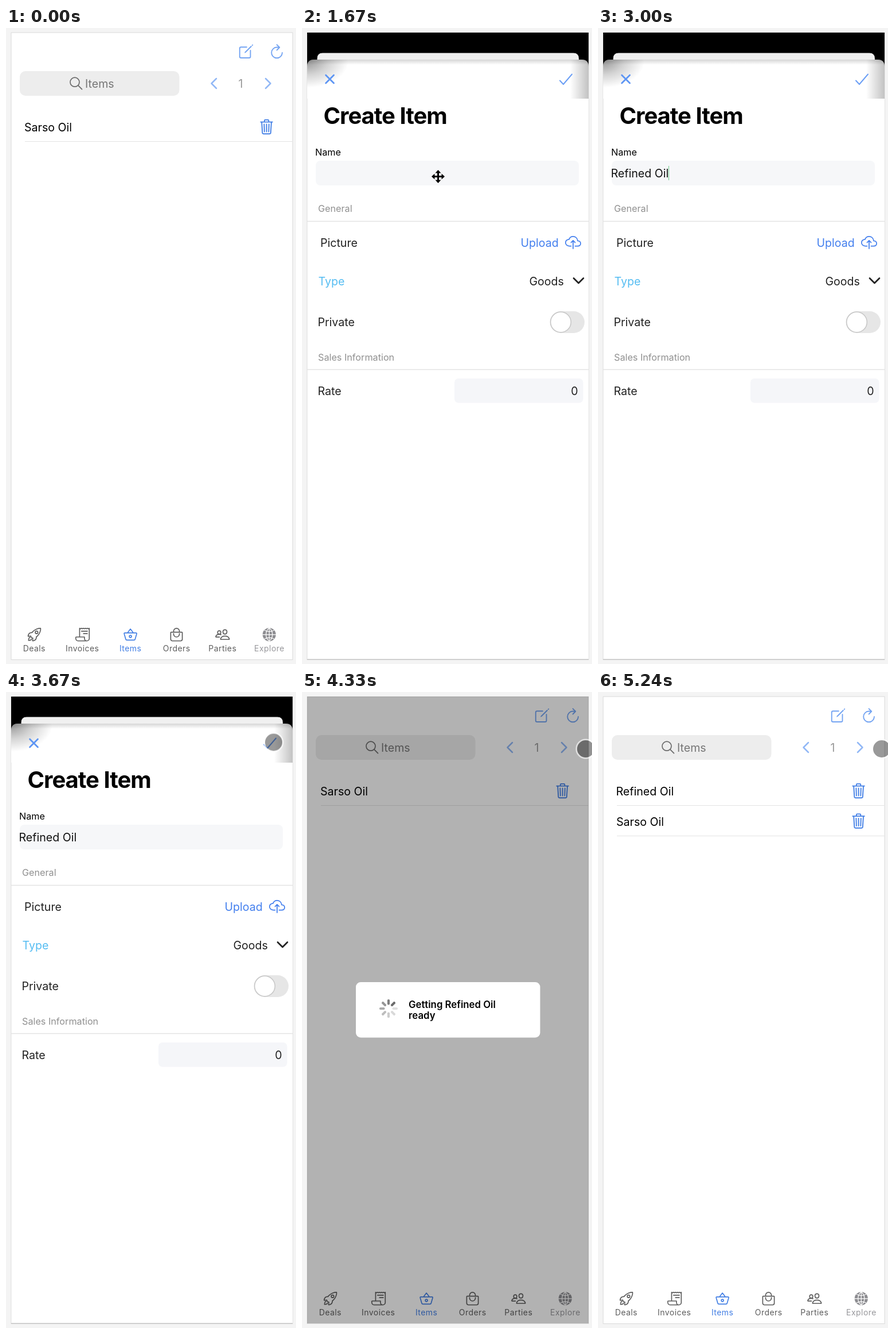
Recreate the animation shown at these times as an HTML page. Size 506x1107 px, loop 5820 ms.

```html
<!DOCTYPE html>
<html lang="en">
<head>
<meta charset="utf-8">
<title>Create Item</title>
<style>
html, body { margin: 0; width: 100%; height: 100%; overflow: hidden; background: #f4f4f4; }
svg { display: block; width: 100vw; height: 100vh; }
text, .name { font: 19.6px Inter, Roboto, sans-serif; }
.icon { fill: none; stroke: currentColor; stroke-width: 32; stroke-linecap: round; stroke-linejoin: round; }
.line { fill: none; stroke: currentColor; stroke-linecap: round; stroke-linejoin: round; }
.tabs text { font-size: 14px; letter-spacing: .45px; text-anchor: middle; fill: currentColor; }
.small { font-size: 16.2px; fill: #909090; }
.rule { stroke: #e4e4e4; fill: none; }
.form { fill: #222; }

/* every change is a hard cut on one 5820 ms clock */
.list, .sheet, .first, .rows, .busy, .edges, .dot, .move, .caret, .name b {
  animation: 5820ms step-end infinite;
}
.sheet { animation-name: sheet; }
.first { animation-name: first; }
.rows { animation-name: rows; }
.busy { animation-name: busy; }
.edges { animation-name: edges; }
.dot { animation-name: dot; }
.move { animation-name: move; }
.caret { animation-name: caret; }
@keyframes sheet { 0% { visibility: hidden } 17.18% { visibility: visible } 68.72%, 100% { visibility: hidden } }
@keyframes first { 0% { visibility: visible } 80.24%, 100% { visibility: hidden } }
@keyframes rows { 0% { visibility: hidden } 80.24%, 100% { visibility: visible } }
@keyframes busy { 0% { visibility: hidden } 74.39% { visibility: visible } 80.24%, 100% { visibility: hidden } }
@keyframes edges { 0% { visibility: hidden } 68.72% { visibility: visible } 74.39%, 100% { visibility: hidden } }
@keyframes move { 0% { visibility: hidden } 28.69% { visibility: visible } 34.36%, 100% { visibility: hidden } }
@keyframes dot {
  0% { visibility: hidden; transform: translate(443px, 29px) }
  5.67% { visibility: visible; transform: translate(443px, 29px) }
  11.51% { visibility: visible; transform: translate(420px, 38px) }
  17.18% { visibility: visible; transform: translate(371px, 203px) }
  22.85% { visibility: visible; transform: translate(238px, 258px) }
  28.69% { visibility: hidden; transform: translate(238px, 258px) }
  57.21% { visibility: visible; transform: translate(495px, 107px) }
  63.05% { visibility: visible; transform: translate(467px, 87.5px) }
  74.39%, 100% { visibility: visible; transform: translate(495px, 99px) }
}
@keyframes caret {
  0% { opacity: 0 } 22.85% { opacity: 1 } 28.69% { opacity: 0 }
  34.36% { opacity: 1 } 57.21%, 100% { opacity: 0 }
}

/* the name is typed in four bursts */
.name { height: 26px; line-height: 26px; white-space: pre; color: #111; }
.name b { font-weight: 400; font-size: 0; }
.name b:nth-child(1) { animation-name: type1; }
.name b:nth-child(2) { animation-name: type2; }
.name b:nth-child(3) { animation-name: type3; }
.name b:nth-child(4) { animation-name: type4; }
@keyframes type1 { 0% { font-size: 0 } 34.36%, 100% { font-size: 19.6px } }
@keyframes type2 { 0% { font-size: 0 } 40.03%, 100% { font-size: 19.6px } }
@keyframes type3 { 0% { font-size: 0 } 45.87%, 100% { font-size: 19.6px } }
@keyframes type4 { 0% { font-size: 0 } 51.54%, 100% { font-size: 19.6px } }
.caret { display: inline-block; width: 1.5px; height: 25px; margin-right: -1.5px; background: #6cc98a; vertical-align: top; }
</style>
</head>
<body>
<svg viewBox="0 0 506 1107">
<defs>
  <g id="trash" class="icon" color="#4480e6" transform="translate(439.6 157) scale(.0586)">
    <path d="M112 112l20 320c.95 18.49 14.4 32 32 32h184c17.67 0 30.87-13.51 32-32l20-320M80 112h352M192 112V72a24 24 0 0124-24h80a24 24 0 0124 24v40M256 176v224M184 176l8 224M328 176l-8 224"/>
  </g>
  <rect id="spoke" x="-2.1" y="-16" width="4.2" height="9.5" rx="1.8"/>
  <radialGradient id="corner" gradientUnits="userSpaceOnUse" cx="0" cy="0" r="1" gradientTransform="translate(9 58) scale(72 46)">
    <stop offset="0" stop-opacity=".4"/><stop offset=".5" stop-opacity=".17"/><stop offset="1" stop-opacity="0"/>
  </radialGradient>
  <linearGradient id="side" x1="1" x2="0">
    <stop offset="0" stop-opacity=".24"/><stop offset=".5" stop-opacity=".12"/><stop offset="1" stop-opacity="0"/>
  </linearGradient>
  <linearGradient id="strip" x2="0" y2="1">
    <stop offset="0" stop-opacity=".16"/><stop offset="1" stop-opacity="0"/>
  </linearGradient>
  <clipPath id="card"><path d="M9 123V67q0-12 12-12H488q12 0 12 12v56z"/></clipPath>
</defs>

<rect width="506" height="1107" fill="#f4f4f4"/>
<rect x="9" y="8" width="491" height="1091.5" fill="#fff" stroke="#dadada"/>

<g class="list">
  <g class="icon" color="#74a4f2">
    <g transform="translate(404 25.8) scale(.0586)">
      <path d="M384 224v184a40 40 0 01-40 40H104a40 40 0 01-40-40V168a40 40 0 0140-40h167"/>
      <path fill="currentColor" stroke="none" d="M460 53a16 16 0 00-23 0L424 65a8 8 0 000 11l12 12a8 8 0 0011 0l12-12a16 16 0 001-23zM399 90L219 270a9 9 0 00-3 4l-8 25a4 4 0 005 5l25-9a9 9 0 004-2l180-180a9 9 0 000-13l-10-10a9 9 0 00-13 0z"/>
    </g>
    <path transform="translate(457.6 25.7) scale(.0586)" d="M320 146s24.36-12-64-12a160 160 0 10160 160M256 58l80 80-80 80"/>
  </g>
  <rect x="24" y="75" width="278.5" height="43" rx="10" fill="#ededed"/>
  <g class="line" color="#6c6c6c" stroke-width="1.7"><circle cx="120" cy="94.2" r="8"/><path d="M126 100.2l6.5 6.5"/></g>
  <text x="138" y="104" fill="#777">Items</text>
  <path class="line" color="#92b8f6" stroke-width="2.5" d="M367 88l-8.5 8.5 8.5 8.5M453 88l8.5 8.5-8.5 8.5"/>
  <text x="409.5" y="104" text-anchor="middle" fill="#979797">1</text>

  <use href="#trash"/>
  <path class="rule" d="M33 197.5H500"/>
  <text class="first" x="32" y="180">Sarso Oil</text>
  <g class="rows">
    <text x="31.5" y="180">Refined Oil</text>
    <text x="32" y="232.5">Sarso Oil</text>
    <use href="#trash" y="52.5"/>
    <path class="rule" d="M33 250.5H500"/>
  </g>

  <g class="tabs" color="#5e5e5e">
    <g class="icon">
      <g transform="translate(36 1042.3) scale(.0527)">
        <path d="M462 54a4 4 0 00-3-4c-55-13-180 34-249 103a295 295 0 00-33 39c-21-2-42 0-60 7-50 22-65 80-69 105a9 9 0 0010 11l81-9a180 180 0 001 18 18 18 0 005 11l32 32a18 18 0 0011 5 180 180 0 0018 1l-9 81a9 9 0 0010 10c25-4 83-19 105-69 8-18 10-39 8-60a294 294 0 0039-33c68-68 115-191 103-248z"/>
        <circle cx="329" cy="183" r="43"/>
        <path d="M110 352a45 45 0 00-27 13C66 383 64 448 64 448s66-2 83-19a45 45 0 0013-27"/>
      </g>
      <path transform="translate(120 1042.3) scale(.0527)" d="M160 336V48l32 16 32-16 32 16 32-16 32 16 32-16 32 16 32-16 32 16 32-16v336a80 80 0 01-160 0v-48H48a16 16 0 00-16 16c0 64 7 112 80 112h288M224 144h192M288 224h128"/>
      <g color="#437fe4" transform="translate(203.6 1042.7) scale(.0527)">
        <path d="M68 192A20 20 0 0048 212l1 6 52 182a40 40 0 0039 30h232a41 41 0 0040-30l52-182v-6a20 20 0 00-20-20zM160 192l96-128 96 128"/>
        <circle cx="256" cy="311" r="37"/>
      </g>
      <path transform="translate(284 1042.3) scale(.0527)" d="M80 176a16 16 0 00-16 16v216c0 30 26 56 56 56h272c30 0 56-25 56-55V192a16 16 0 00-16-16zM160 176v-32a96 96 0 01192 0v32M160 224v16a96 96 0 00192 0v-16"/>
      <path transform="translate(364.3 1042.3) scale(.0527)" d="M402 168c-3 41-33 72-66 72s-63-31-66-72c-3-42 26-72 66-72s69 30 66 72zM336 304c-65 0-128 32-144 95-2 9 4 17 12 17h264c8 0 14-8 12-17-16-64-79-95-144-95zM200 186c-2 32-27 58-53 58s-51-26-53-58c-2-34 21-58 53-58s55 25 53 58zM206 260c-18-8-38-11-59-11-52 0-102 25-115 76-1 6 3 13 10 13h112"/>
    </g>
    <g transform="translate(459.3 1055.8)">
      <circle r="11.6" fill="#8c8c90"/>
      <path fill="none" stroke="#fff" stroke-width="1.2" d="M0-12V12M-12 0H12M0-11.5C-7.5-6-7.5 6 0 11.5 7.5 6 7.5-6 0-11.5M-8.5-7.5Q0-3 8.5-7.5M-8.5 7.5Q0 3 8.5 7.5"/>
    </g>
    <text x="49.3" y="1085">Deals</text>
    <text x="133.2" y="1085">Invoices</text>
    <text x="217.2" y="1085" color="#437fe4">Items</text>
    <text x="297.7" y="1085">Orders</text>
    <text x="377.8" y="1085">Parties</text>
    <text x="459.5" y="1085" color="#98989c">Explore</text>
  </g>
</g>

<g class="edges" fill="none" stroke="#555">
  <path d="M9.5 1099V8.5H500M9 1031.5H500M9 1098.5H500"/>
  <path stroke="#aaa" d="M500 8V1099"/>
</g>

<g class="busy">
  <rect x="9" y="8" width="491" height="1091" fill-opacity=".3"/>
  <rect x="94" y="505" width="321.5" height="96.5" rx="8.5" fill="#fff"/>
  <g transform="translate(151 551)">
    <use href="#spoke" transform="rotate(45)" opacity=".58"/>
    <use href="#spoke" opacity=".5"/>
    <use href="#spoke" transform="rotate(-45)" opacity=".41"/>
    <use href="#spoke" transform="rotate(-90)" opacity=".33"/>
    <use href="#spoke" transform="rotate(-135)" opacity=".26"/>
    <use href="#spoke" transform="rotate(180)" opacity=".2"/>
    <use href="#spoke" transform="rotate(135)" opacity=".15"/>
    <use href="#spoke" transform="rotate(90)" opacity=".12"/>
  </g>
  <g style="font-weight:600">
    <text x="186" y="550" style="font-size:16.8px;font-weight:600">Getting Refined Oil</text>
    <text x="186" y="569" style="font-size:16.8px;font-weight:600">ready</text>
  </g>
</g>

<g class="sheet">
  <rect x="9" y="8" width="491" height="1091" fill="#fff"/>
  <path class="rule" d="M9 60V1099M500.5 60V1099"/>
  <path stroke="#b4b4b4" d="M9 1099H500"/>
  <rect x="9" y="8" width="491" height="62"/>
  <path fill="#f0f0f0" d="M26.500 70V53q0-9.500 9.500-9.500H473.500q9.500 0 9.500 9.500V70z"/>
  <path fill="#fff" d="M9 123V67q0-12 12-12H488q12 0 12 12v56z"/>
  <g clip-path="url(#card)">
    <rect x="9" y="55" width="72" height="49" fill="url(#corner)"/>
    <rect x="9" y="55" width="491" height="9" fill="url(#strip)"/>
    <rect x="468" y="55" width="32" height="68" fill="url(#side)"/>
  </g>
  <path class="line" color="#5d95f4" stroke-width="2.7" d="M41.500 82l14 14M55.500 82l-14 14"/>
  <path class="line" color="#6c9ff5" stroke-width="2" d="M450 91.500l6 6.500 15-17.500"/>
  <text x="37.500" y="167" style="font-size:40px;font-weight:700;letter-spacing:-1px">Create Item</text>
  <text x="23" y="222" style="font-size:16.2px">Name</text>
  <rect x="24" y="231" width="459" height="43" rx="8" fill="#f6f7f9"/>
  <text class="small" x="28" y="320">General</text>
  <path class="rule" stroke-width="1.3" d="M9 336.500H500M9 594.500H500"/>
  <g class="form">
    <text x="32" y="381">Picture</text>
    <text x="381.500" y="381" fill="#437fee">Upload</text>
    <text x="28.500" y="448" fill="#56bdf2">Type</text>
    <text x="396.500" y="448">Goods</text>
    <text x="27.500" y="519">Private</text>
    <text x="27.500" y="639">Rate</text>
  </g>
  <path class="icon" color="#437fee" transform="translate(459 359.400) scale(.0547)" d="M320 368h76c55 0 100-29 100-84s-53-81-96-83c-9-85-71-137-144-137-69 0-113 46-128 91-60 6-112 44-112 107s54 106 120 106h56M320 256l-64-64-64 64M256 448V208"/>
  <path class="line" color="#222" stroke-width="2.700" d="M474 435.500l8.500 8.500 8.500-8.500"/>
  <rect x="432.500" y="493" width="60.500" height="38" rx="19" fill="#e6e6e6"/>
  <circle cx="451.500" cy="512" r="17.800" fill="#fff" stroke="#c6c6c6" stroke-width="1.500"/>
  <text class="small" x="28" y="579">Sales Information</text>
  <rect x="266" y="610" width="224.500" height="42.500" rx="7" fill="#f5f6f9"/>
  <text class="form" x="481.500" y="639" text-anchor="end">0</text>
  <foreignObject x="22.500" y="240" width="400" height="28">
    <div class="name"><b>Ref</b><b>ined </b><b>Oi</b><b>l</b><i class="caret"></i></div>
  </foreignObject>
</g>

<path class="move" transform="translate(237.500 258.500)" stroke="#fff" stroke-width="1.200" paint-order="stroke" d="M0-11.500l5 5.500H1.500v4.500H6V-5l5.500 5L6 5V1.500H1.500V6H5l-5 5.500L-5 6h3.500V1.500H-6V5l-5.500-5L-6-5v3.500h4.500V-6H-5z"/>
<g class="dot">
  <circle r="16.300" fill="none" stroke="#fff" stroke-width="2.500" stroke-opacity=".6"/>
  <circle r="15" fill-opacity=".4"/>
</g>
</svg>
</body>
</html>
```
